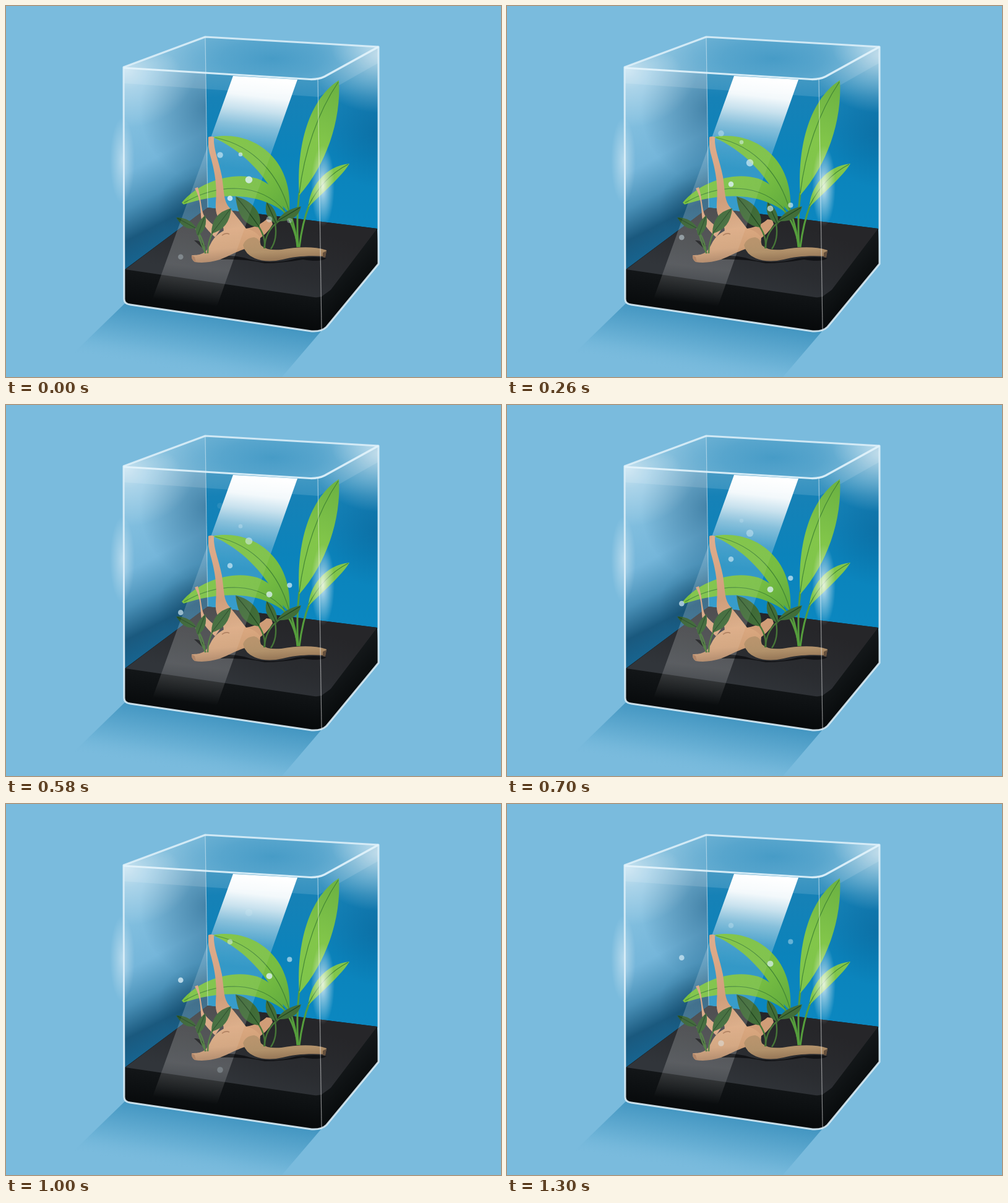
Write an HTML page with a canvas that moves like this. It is 800 px wide and 600 px high and loops after 1.32 s.

```html
<!DOCTYPE html>
<html lang="en">
<head>
<meta charset="utf-8">
<title>Aquarium</title>
<style>
html, body { margin: 0; width: 100%; height: 100%; overflow: hidden; background: #7abbdd; }
canvas { display: block; }
</style>
</head>
<body>
<canvas id="stage" width="800" height="600"></canvas>
<script>
const LOOP = 1320, STEP = 20;
const stage = document.getElementById('stage').getContext('2d');
const backdrop = document.createElement('canvas');
backdrop.width = 800;
backdrop.height = 600;
const ctx = backdrop.getContext('2d');

const white = a => `rgba(255,255,255,${a})`;

function addStops(gradient, stops) {
  for (const [at, color] of stops) gradient.addColorStop(at, color);
  return gradient;
}

function linear(x0, y0, x1, y1, ...stops) {
  return addStops(ctx.createLinearGradient(x0, y0, x1, y1), stops);
}

function fill(d, style) {
  ctx.fillStyle = style;
  ctx.fill(new Path2D(d));
}

function stroke(d, style, width) {
  ctx.strokeStyle = style;
  ctx.lineWidth = width;
  ctx.stroke(new Path2D(d));
}

function glow(x, y, rx, ry, ...stops) {
  ctx.save();
  ctx.translate(x, y);
  ctx.scale(rx, ry);
  ctx.fillStyle = addStops(ctx.createRadialGradient(0, 0, 0, 0, 0, 1), stops);
  ctx.fillRect(-1, -1, 2, 2);
  ctx.restore();
}

function clipped(d, draw) {
  ctx.save();
  ctx.clip(new Path2D(d));
  draw();
  ctx.restore();
}

const TANK = 'M190 99L322 50L602 66L602 417L518 519Q510 527 494 526L201 483Q191 482 191 474Z';
const LID = 'M190 99L322 50L602 66L516 115Q510 119 498 118Z';

function drawFloorShadow() {
  fill('M192 481L90 580L90 600L446 600L510 525Z',
    linear(330, 488, 313, 596, [0, '#3b90bd'], [.3, '#509fc8'], [.7, '#6db3d7'], [1, 'rgba(122,187,221,0)']));
}

function drawWalls() {
  fill('M322 50L602 66L602 362L326 328Z',
    linear(420, 80, 420, 350, [0, '#3b93c0'], [.25, '#1681b6'], [.6, '#0b83bb'], [1, '#0b87c0']));

  clipped('M190 99L322 50L326 328L192 427Z', () => {
    ctx.fillStyle = linear(190, 190, 286, 375,
      [0, '#82bfdf'], [.35, '#75b6da'], [.6, '#4a91b8'], [.82, '#1a597e'], [1, '#17648f']);
    ctx.fillRect(180, 40, 150, 400);
    glow(326, 165, 110, 120, [0, 'rgba(22,85,125,.55)'], [1, 'rgba(22,85,125,0)']);
    glow(326, 325, 80, 70, [0, 'rgba(20,62,88,.4)'], [1, 'rgba(20,62,88,0)']);
  });
  clipped(TANK, () => {
    glow(610, 205, 105, 90, [0, 'rgba(8,88,140,.45)'], [1, 'rgba(8,88,140,0)']);
    glow(192, 102, 115, 95, [0, white(.6)], [.35, white(.32)], [1, white(0)]);
    glow(604, 78, 115, 95, [0, white(.65)], [.4, white(.36)], [1, white(0)]);
  });
}

function drawLid() {
  fill('M191 125L505 147L602 92L602 66L504 118L190 99Z', white(.12));
  clipped(LID, () => {
    ctx.fillStyle = 'rgba(127,188,219,.75)';
    ctx.fillRect(180, 40, 430, 90);
    glow(430, 85, 165, 60, [0, 'rgba(58,148,194,.75)'], [.5, 'rgba(66,153,198,.5)'], [1, 'rgba(80,162,205,0)']);
    glow(192, 100, 90, 38, [0, white(.45)], [1, white(0)]);
    glow(600, 68, 75, 45, [0, white(.4)], [1, white(0)]);
  });
}

function drawSoil() {
  fill('M192 426L326 326L600 360L602 417L518 519Q510 527 494 526L201 483Q191 482 191 474Z',
    linear(350, 430, 340, 515, [0, '#16191b'], [.5, '#0d1012'], [1, '#050708']));
  fill('M193 426L326 326L600 360L525 459Q515 473 498 471Z',
    linear(410, 335, 370, 460, [0, '#262629'], [.55, '#2a2c30'], [1, '#31353a']));
  fill('M525 459L600 360L602 417L518 519Q511 526 510 524L511 469Z',
    linear(550, 410, 590, 450, [0, '#15191b'], [1, '#070a0b']));
}

function drawLeaf(outline, rib, style, ribColor = '#438735') {
  fill(outline, style);
  stroke(rib, ribColor, 1.2);
}

function drawTallPlant() {
  const green = linear(300, 180, 500, 380, [0, '#80c63d'], [.55, '#76bd42'], [1, '#47963a']);
  const tall = linear(470, 300, 540, 140, [0, '#7ec54b'], [.5, '#82c64a'], [1, '#6eb443']);
  for (const d of ['M474 302Q469 345 472 390', 'M490 322Q479 350 474 390',
                   'M454 325Q467 350 471 390', 'M446 328Q466 352 472 390']) {
    stroke(d, '#559d3c', 3);
  }
  drawLeaf('M334 212C398 200 465 246 458 334C451 328 446 323 441 315C414 268 382 234 334 212Z',
    'M338 213C404 226 442 277 457 330', green);
  drawLeaf('M284 318C312 284 366 267 406 279C432 289 446 307 449 333C410 303 350 300 287 321Z',
    'M288 318C344 286 410 285 450 331', green);
  drawLeaf('M474 306C469 239 484 155 538 120C542 186 517 257 474 306Z',
    'M537 123C504 172 482 235 474 303', tall);
  drawLeaf('M489 325C489 295 516 258 555 255C543 275 515 299 489 325Z',
    'M553 256C522 272 502 297 489 323', tall);
}

function drawDriftwood() {
  fill('M308 413Q345 398 385 407Q425 421 470 408Q502 404 518 408Q508 415 480 410Q445 416 418 416Q372 405 308 413Z', '#121316');
  fill('M304 379Q313 378 322 388L317 391Z', '#191a1c');
  const bark = linear(330, 220, 395, 400, [0, '#dda683'], [.5, '#cd9670'], [.8, '#dbab83'], [1, '#c4936e']);

  fill('M305 295L310 293C316 313 315 329 320 339Q329 351 346 362L338 374Q315 354 315 339C314 319 312 307 305 295Z', '#d9a581');
  fill('M327 212Q331 210 336 212C335 232 344 250 349 276C353 306 352 315 361 326Q376 344 388 360L352 368Q352 350 342 340Q338 333 339 318C342 290 336 263 331 245Q326 230 327 212Z', bark);
  fill('M374 361Q403 361 421 345L429 346L431 353Q422 369 405 379Z', '#d09d77');
  fill('M300 403C316 403 323 400 330 386Q340 364 366 359Q397 356 411 374L410 389C384 389 365 403 346 410Q323 417 305 414Q299 410 300 403Z',
    linear(345, 360, 350, 415, [0, '#dca981'], [.6, '#d0a078'], [1, '#a87f5f']));
  fill('M383 387Q387 375 401 374Q410 376 412 387Q421 396 445 394C468 390 497 388 518 395L516 405C489 403 466 405 447 410Q421 416 402 408Q387 402 383 387Z',
    linear(430, 380, 432, 414, [0, '#b8946d'], [.5, '#b1916a'], [1, '#937455']));
  fill('M512 399L518 396L516 407L512 406Z', '#65503d');
  fill('M300 403L305 406L307 414Q299 411 300 403Z', '#a87a5b');
  stroke('M349 371Q355 366 361 369', '#a97754', 1.6);
}

function drawSmallPlants() {
  for (const d of ['M306 360Q319 374 322 400', 'M311 369Q314 384 323 400', 'M334 366Q326 382 326 400',
                   'M408 356Q421 376 417 392', 'M435 352Q439 377 428 393', 'M442 347Q418 364 418 392']) {
    stroke(d, '#477738', 2.4);
  }
  const dark = linear(310, 310, 390, 370, [0, '#315c2c'], [1, '#426e39']);
  const leaves = [
    ['M275 342Q296 342 307 358Q290 366 275 342Z', 'M277 343L306 359'],
    ['M322 338Q327 360 310 372Q300 359 322 338Z', 'M321 341L310 370'],
    ['M364 327Q361 361 332 368Q332 335 364 327Z', 'M362 329L333 367'],
    ['M371 308C396 313 417 335 409 358C384 355 374 336 371 308Z', 'M373 310Q391 331 409 357'],
    ['M421 317Q440 329 438 353Q415 343 421 317Z', 'M422 319L437 352'],
    ['M477 324Q471 350 438 348Q449 329 477 324Z', 'M475 326L440 347']
  ];
  for (const [outline, rib] of leaves) drawLeaf(outline, rib, dark, '#20451f');
}

function drawBeam(...stops) {
  fill('M367 113L471 119L339 491L236 476Z', linear(400, 115, 355, 488, ...stops));
}

function drawGlass() {
  glow(188, 250, 20, 70, [0, white(.42)], [.4, white(.25)], [1, white(0)]);
  glow(512, 291, 19, 66, [0, white(.8)], [.35, white(.48)], [1, white(0)]);
  stroke('M322 50L326 326', white(.42), 1.2);
  stroke('M504 118L510 523', white(.5), 1.2);
  ctx.lineJoin = 'round';
  stroke(TANK, 'rgba(223,241,250,.88)', 3);
  stroke('M190 100L491 118.5Q505 119 515 114L602 66', 'rgba(228,244,252,.9)', 3.2);
}

function drawScene() {
  ctx.fillStyle = '#7abbdd';
  ctx.fillRect(0, 0, 800, 600);
  drawFloorShadow();
  drawWalls();
  drawLid();
  drawSoil();
  drawBeam([0, white(1)], [.08, white(.95)], [.14, white(.77)], [.21, white(.48)],
    [.3, white(.2)], [.4, white(.1)], [.84, white(.13)], [.94, white(.05)], [1, white(0)]);
  drawTallPlant();
  drawDriftwood();
  drawSmallPlants();
  drawBeam([.1, white(0)], [.3, white(.07)], [.84, white(.09)], [1, white(0)]);
  drawGlass();
}

// Opacity is given as [time, alpha] pairs; y and speed describe a steady rise.
const bubbles = [
  { x: 346, y: 241, r: 4.8, speed: .1345, fade: [[0, .6], [260, .4], [460, .14], [580, .1], [700, 0]] },
  { x: 346, y: 573.3, r: 4.8, speed: .1433, fade: [[900, 0], [1000, .24], [1300, .43]] },
  { x: 379, y: 240, r: 3.3, speed: .0756, fade: [[0, .65], [460, .42], [820, .1], [900, 0]] },
  { x: 392.5, y: 281, r: 5.8, speed: .1053, fade: [[0, .8], [260, .65], [580, .52], [820, .34], [1000, .18], [1160, 0]] },
  { x: 362, y: 311, r: 4.3, speed: .0881, fade: [[0, .82], [260, .8], [580, .64], [1000, .48], [1300, .3]] },
  { x: 425.5, y: 345, r: 4.9, speed: .0667, fade: [[0, .4], [260, .64], [460, .75], [1000, .78], [1300, .7]] },
  { x: 458.3, y: 347, r: 4.1, speed: .0956, fade: [[0, .35], [260, .62], [580, .7], [1000, .6], [1300, .42]] },
  { x: 282.3, y: 405.7, r: 4.3, speed: .1208, fade: [[0, .3], [260, .46], [580, .65], [1000, .76], [1300, .66]] }
];

function alphaAt(keys, t) {
  if (t <= keys[0][0]) return keys[0][1];
  for (let i = 1; i < keys.length; i++) {
    const [t0, a0] = keys[i - 1], [t1, a1] = keys[i];
    if (t <= t1) return a0 + (a1 - a0) * (t - t0) / (t1 - t0);
  }
  return keys[keys.length - 1][1];
}

function render(now) {
  const t = Math.floor((now % LOOP) / STEP) * STEP;
  stage.drawImage(backdrop, 0, 0);
  for (const { x, y, r, speed, fade } of bubbles) {
    stage.fillStyle = `rgba(222,242,250,${alphaAt(fade, t)})`;
    stage.beginPath();
    stage.arc(x, y - speed * t, r, 0, Math.PI * 2);
    stage.fill();
  }
  requestAnimationFrame(render);
}

drawScene();
render(0);
</script>
</body>
</html>
```
